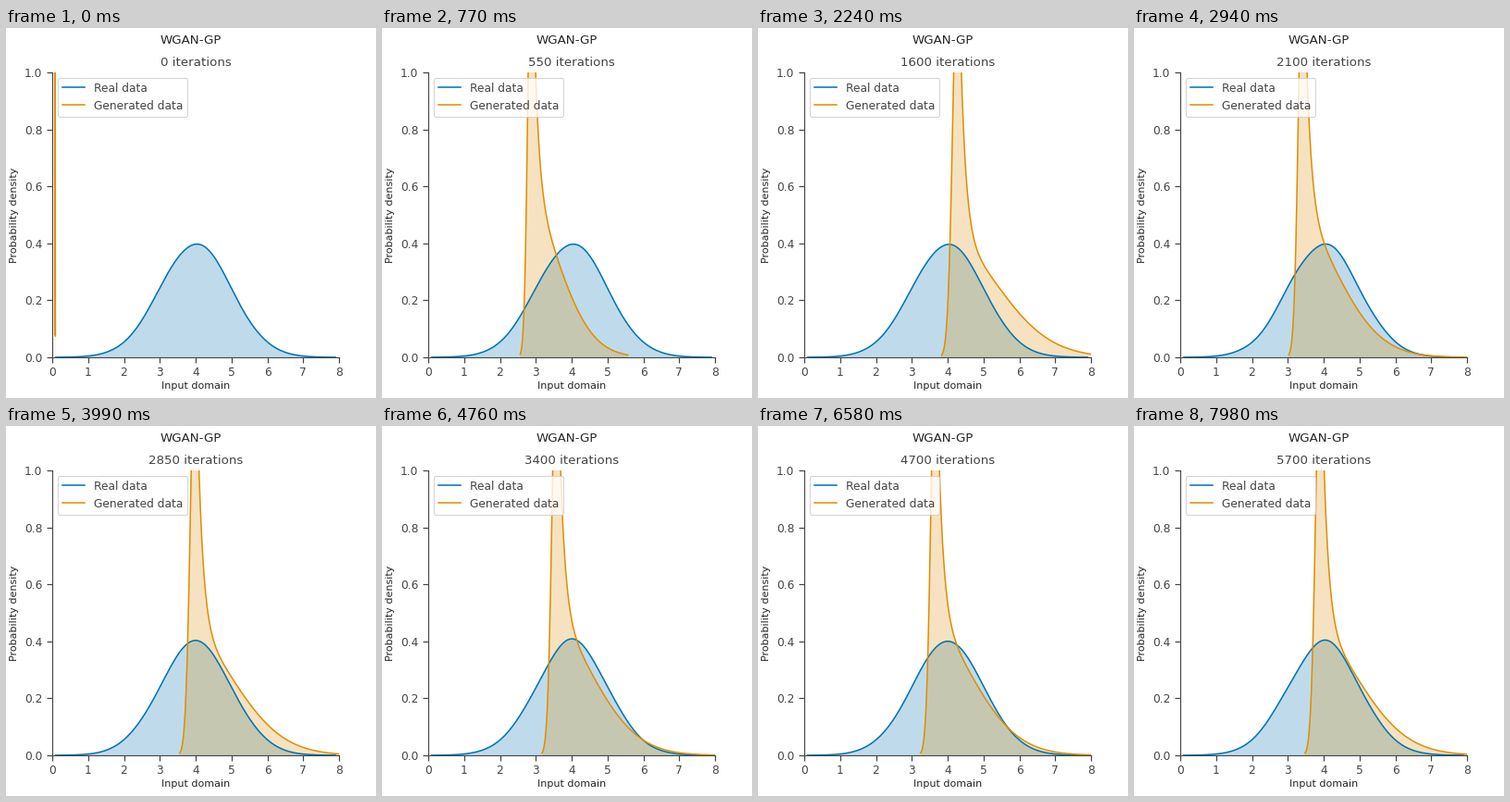
A matplotlib script for the animation above (8000 ms loop, 400 by 400 pixels).

```python
import numpy as np
import matplotlib.pyplot as plt
from matplotlib.animation import FuncAnimation
from matplotlib.patches import Polygon

LOOP, TICK, HOLD = 8000, 20, 70      # ms
ITERS_PER_STEP = 50
INK, SOFT_INK = "#262626", "#444444"
BLUE, ORANGE = "#0173b2", "#de8f05"

# Turning points of the generated mode: step and position
TURNS = [0, 21, 42, 57, 80, 94, 114]
MODES = [0.08, 5.3, 3.43, 4.0, 3.12, 3.67, 3.92]

plt.rcParams.update({
    "font.family": "DejaVu Sans", "font.size": 12, "text.color": INK,
    "axes.edgecolor": SOFT_INK, "axes.linewidth": 1,
    "xtick.color": SOFT_INK, "ytick.color": SOFT_INK,
    "xtick.labelsize": 11, "ytick.labelsize": 11,
    "xtick.major.size": 5.5, "ytick.major.size": 5.5,
    "xtick.major.width": 1.1, "ytick.major.width": 1.1,
    "xtick.major.pad": 3.2, "ytick.major.pad": 4,
})


def mode_at(step):
    """Swing between the turning points with a cosine ease."""
    i = min(np.searchsorted(TURNS, step, side="right"), len(TURNS) - 1)
    t = (step - TURNS[i - 1]) / (TURNS[i] - TURNS[i - 1])
    ease = (1 - np.cos(np.pi * t)) / 2
    return MODES[i - 1] + (MODES[i] - MODES[i - 1]) * ease


def real_curve(step):
    """Normal density around 4 with a little sampling noise."""
    x = np.linspace(0.1, 7.9, 240)
    rng = np.random.default_rng(step)
    ripple = sum(rng.normal(0, 0.01) * np.sin(k * x + rng.uniform(0, 2 * np.pi))
                 for k in (2, 3, 4))
    return x, np.exp(-(x - 4) ** 2 / 2) / np.sqrt(2 * np.pi) * (1 + ripple)


def generated_curve(step):
    """Steep left flank, sharp peak and a long tail that widens with the mode."""
    mode = mode_at(step)
    grow = 1 - 0.99 * np.exp(-step / 5)
    rise = 0.175 + 0.03 * (mode - 3.4)
    tail = 0.39 + 0.33 * mode
    peak, base = 1.1, 0.69 / tail

    d = np.linspace(-2.3 * rise, 3 * tail, 500)
    r = np.abs(d)
    left = (peak + base) * np.exp(-(r / rise) ** 2)
    right = peak * np.exp(-r / 0.155) + base * np.exp(-(r / tail) ** 1.75)
    y = np.where(d < 0, left, right)
    seen = y > 0.075 * (1 - grow)
    return mode + d[seen] * grow, y[seen]


fig, ax = plt.subplots(figsize=(5, 5), dpi=80)
fig.subplots_adjust(left=0.125, right=0.9, bottom=0.11, top=0.88)
ax.set(xlim=(0, 8), ylim=(0, 1), xticks=range(9), yticks=np.linspace(0, 1, 6))
ax.spines[["top", "right"]].set_visible(False)
fig.suptitle("WGAN-GP", fontsize=12, y=0.983)
title = ax.set_title("", fontsize=12, y=1.0, color=SOFT_INK)
fig.text(205 / 400, 9.5 / 400, "Input domain", fontsize=10, ha="center", va="baseline")
fig.text(12 / 400, 198 / 400, "Probability density", fontsize=10, rotation=90,
         rotation_mode="anchor", ha="center", va="baseline")


def add_density(color, label):
    fill = Polygon(np.zeros((3, 2)), facecolor=color, alpha=0.25, lw=0)
    ax.add_patch(fill)
    line, = ax.plot([], [], color=color, lw=1.4, label=label)
    return line, fill


real = add_density(BLUE, "Real data")
generated = add_density(ORANGE, "Generated data")
ax.legend(loc="upper left", fontsize=11, borderaxespad=0.46, labelcolor=SOFT_INK)


def show(density, curve):
    line, fill = density
    x, y = curve
    line.set_data(x, y)
    fill.set_xy(np.column_stack([np.r_[x[0], x, x[-1]], np.r_[0, y, 0]]))


def update(frame):
    step = (frame * TICK + TICK // 2) // HOLD
    title.set_text(f"{step * ITERS_PER_STEP} iterations")
    show(real, real_curve(step))
    show(generated, generated_curve(step))
    return title, *real, *generated


anim = FuncAnimation(fig, update, frames=LOOP // TICK, interval=TICK,
                     init_func=lambda: update(0), repeat=True, repeat_delay=0)
plt.show()
```
